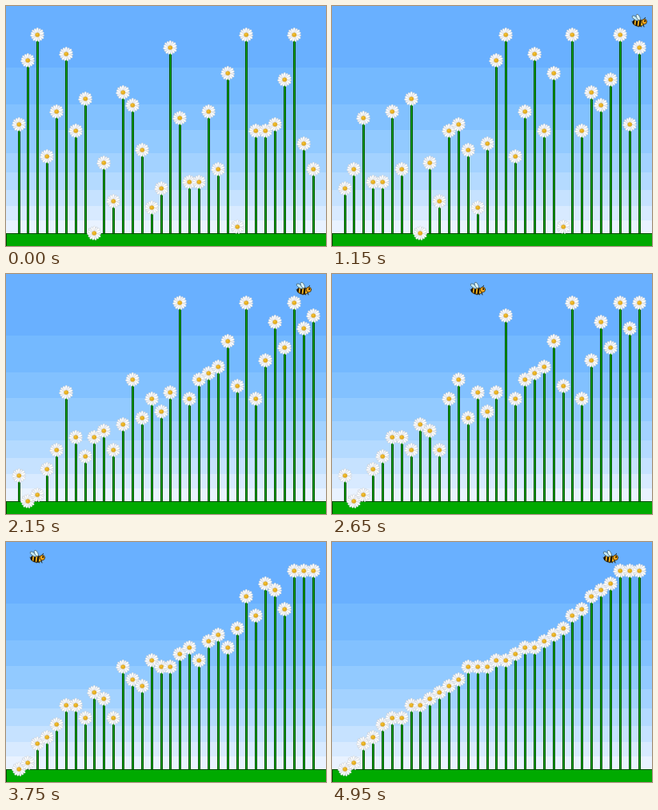
Animation of 400 by 300 pixels, one loop 5050 ms. Source, as an HTML page with a canvas:

```html
<!DOCTYPE html>
<html lang="en">
<head>
<meta charset="utf-8">
<title>Shell sort in the meadow</title>
<style>
  html, body { margin: 0; width: 100%; height: 100%; overflow: hidden; }
  canvas { display: block; width: 400px; height: 300px; }
</style>
</head>
<body>
<canvas id="stage" width="400" height="300"></canvas>
<script>
const ctx = document.getElementById('stage').getContext('2d');
const TAU = Math.PI * 2;
const GROUND = 284;
const FIRST_MS = 250, STEP_MS = 100;

const heights = [
  17, 27, 31, 12, 19, 28, 16, 21, 0, 11, 5, 22, 20, 13, 4, 7,
  29, 18, 8, 8, 19, 10, 25, 1, 31, 16, 16, 17, 24, 31, 14, 10
];

// Sky bands: lower edge and colour.
const sky = [
  [77, '#69b0ff'], [123, '#74b9ff'], [155, '#82c1ff'],
  [184, '#92caff'], [208, '#a3d2ff'], [230, '#b4daff'],
  [250, '#c6e2ff'], [268, '#d8eaff'], [GROUND, '#e9f2ff']
];

// One step for every insertion that moves something; the bee marks its column.
function shellSort(start) {
  const a = start.slice();
  const steps = [{ values: start, bee: -1 }];
  for (const gap of [15, 7, 3, 1]) {
    for (let i = gap; i < a.length; i++) {
      const v = a[i];
      let j = i;
      for (; j >= gap && a[j - gap] > v; j -= gap) a[j] = a[j - gap];
      a[j] = v;
      if (j !== i) steps.push({ values: a.slice(), bee: i });
    }
  }
  return steps;
}

const steps = shellSort(heights);
const LOOP_MS = FIRST_MS + (steps.length - 1) * STEP_MS;
const columnX = i => Math.floor(16 + i * 368 / 31);

function rect(x, y, w, h, color) {
  ctx.fillStyle = color;
  ctx.fillRect(x, y, w, h);
}

function oval(x, y, rx, ry, angle, fill, stroke, width = 0.6) {
  ctx.beginPath();
  ctx.ellipse(x, y, rx, ry, angle, 0, TAU);
  ctx.fillStyle = fill;
  ctx.fill();
  if (stroke) {
    ctx.strokeStyle = stroke;
    ctx.lineWidth = width;
    ctx.stroke();
  }
}

function drawBackground() {
  let top = 0;
  for (const [bottom, color] of sky) {
    rect(0, top, 400, bottom - top, color);
    top = bottom;
  }
  rect(0, GROUND, 400, 16, '#004800');
  rect(1, GROUND + 1, 399, 15, '#00aa00');
}

function drawStem(x, y) {
  rect(x - 1, y, 3, GROUND - y, '#004c00');
  rect(x, y, 1, GROUND - y, '#00b400');
}

function drawDaisy(x, y) {
  const petals = 15;
  ctx.save();
  ctx.translate(x + 0.3, y);
  for (let k = 0; k < petals; k++) {
    const angle = k * TAU / petals + 0.1;
    const r = k % 2 ? 5.6 : 5.2;
    oval(Math.cos(angle) * r, Math.sin(angle) * r, 3.4, 1.5, angle,
      k % 3 ? '#ffffff' : '#f1f2f6', '#b4bac6', 0.4);
  }
  oval(0, 0, 2.8, 2.6, 0, '#e6ac1c', '#d3b566', 0.5);
  oval(-0.5, -0.6, 1.2, 1, 0, '#f5c534');
  ctx.restore();
}

function drawBee(x) {
  ctx.save();
  ctx.translate(x, 19);
  ctx.lineCap = 'round';

  // Legs, feelers and sting.
  ctx.strokeStyle = '#1c1508';
  ctx.lineWidth = 0.9;
  ctx.beginPath();
  for (const lx of [-2, 1.5, 5]) {
    ctx.moveTo(lx, 4);
    ctx.lineTo(lx + 1, 7);
  }
  ctx.moveTo(6, -2);
  ctx.lineTo(7.5, -4.5);
  ctx.moveTo(-7, 2);
  ctx.lineTo(-9, 0.5);
  ctx.stroke();

  // Striped body.
  ctx.save();
  oval(-1, 2, 7.2, 4.3, 0.12, '#f4b21c');
  ctx.clip();
  for (const sx of [-8, -4, 0.2]) {
    ctx.save();
    ctx.rotate(0.12);
    rect(sx, -4, 2.3, 12, '#17110a');
    ctx.restore();
  }
  ctx.restore();
  ctx.beginPath();
  ctx.ellipse(-1, 2, 7.2, 4.3, 0.12, 0, TAU);
  ctx.strokeStyle = '#1c1508';
  ctx.lineWidth = 0.8;
  ctx.stroke();

  // Head and eye.
  oval(6.4, 0.6, 3.2, 3.3, 0, '#f0a51c', '#1c1508', 0.7);
  oval(7.2, -0.2, 0.9, 1.2, 0, '#120d06');

  // Wings.
  oval(-4.8, -3.7, 4.7, 2, 0.6, '#bfe6f4', '#34515e', 0.7);
  oval(-1.2, -4.8, 4.2, 2, 1.1, '#dbf4fb', '#34515e', 0.7);
  ctx.restore();
}

function draw(time) {
  const t = time % LOOP_MS;
  const n = t < FIRST_MS ? 0 : 1 + Math.floor((t - FIRST_MS) / STEP_MS);
  const { values, bee } = steps[n];
  drawBackground();
  values.forEach((v, i) => {
    const x = columnX(i), y = GROUND - v * 8;
    drawStem(x, y);
    drawDaisy(x, y);
  });
  if (bee >= 0) drawBee(columnX(bee));
}

const startTime = performance.now();
function loop() {
  draw(performance.now() - startTime);
  requestAnimationFrame(loop);
}
loop();
</script>
</body>
</html>
```
